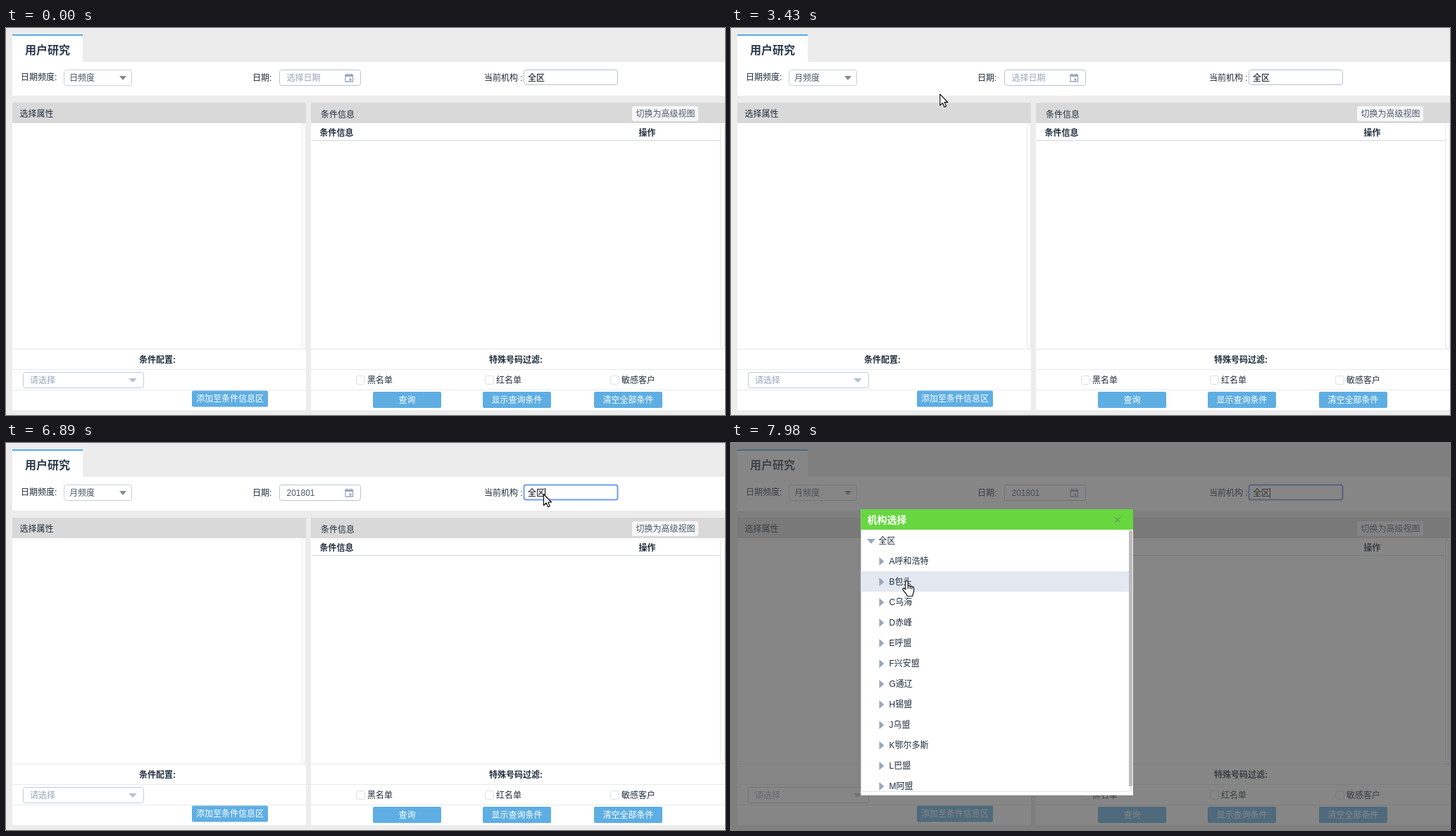
Animation, 1021 px wide and 549 px high, one loop 8 s. Source, as an HTML page:

```html
<!DOCTYPE html>
<html lang="zh-CN">
<head>
<meta charset="utf-8">
<title>用户研究</title>
<style>
html, body { margin: 0; width: 100%; height: 100%; overflow: hidden; background: #ececec; }
svg { display: block; width: 100%; height: 100%; }
text { font-family: "Liberation Sans", "Noto Sans CJK SC", "Noto Sans CJK", sans-serif; white-space: pre; }
.float { filter: drop-shadow(0 1px 2px rgba(0,0,0,.2)); }
</style>
</head>
<body>
<svg id="stage" viewBox="0 0 1021 549" xmlns="http://www.w3.org/2000/svg"></svg>
<script>
const LOOP = 8000;
const INK = '#1f2d3d', GREY = '#48576a', PALE = '#97a8be', BLUE = '#20a0ff';

// ---- markup helpers ----
const rect = (x, y, w, h, fill, more = '') =>
  `<rect x="${x}" y="${y}" width="${w}" height="${h}" fill="${fill}" ${more}/>`;
const box = (x, y, w, h, stroke, more = '') =>
  rect(x + .5, y + .5, w - 1, h - 1, '#fff', `stroke="${stroke}" rx="3" ${more}`);
const path = (d, fill, more = '') => `<path d="${d}" fill="${fill}" ${more}/>`;
const label = (s, x, mid, fill = INK, size = 12, more = '') =>
  `<text x="${x}" y="${mid + size * .37}" font-size="${size}" fill="${fill}" ${more}>${s}</text>`;
const bold = 'font-weight="700"', centred = 'text-anchor="middle"';
const hline = (x, y, w, c = '#e6e8ea') => rect(x, y, w, 1, c);
const group = (id, inner, more = '') => `<g id="${id}" ${more}>${inner}</g>`;
const button = (s, x, y, w) =>
  rect(x, y, w, 23, '#5eaee3', 'rx="2"') +
  label(s, x + w / 2, y + 11.5, '#fff', 12, centred + ' font-weight="500"');
const check = (s, x) => box(x, 493, 13, 13, '#d9dde3') + label(s, x + 16, 499.5);

// ---- page ----
function page() {
  const calendar =
    path('M482 66.5h10.5v9.5h-10.5z', 'none', `stroke="${PALE}" stroke-width="1.3"`) +
    rect(481.5, 66, 11.5, 3, PALE) + rect(483.5, 64.5, 1.5, 2, PALE) +
    rect(489.5, 64.5, 1.5, 2, PALE) + rect(487.5, 71.5, 3, 3, PALE);
  return rect(0, 0, 1021, 549, '#ececec') +
    rect(9, 9, 100, 40, '#fff') + rect(9, 9, 100, 2, '#58aaea') +
    label('用户研究', 27, 31, '#2b3a4d', 16, bold) +
    rect(9, 48, 1012, 48, '#fff') +
    label('日期频度:', 21, 69.5) +
    box(82, 59, 97, 23, '#c9d0da', 'id="freqBox"') +
    label('日频度', 90, 71, GREY, 12, 'id="freq"') + path('', '#84888f', 'id="freqArrow"') +
    label('日期:', 350, 71) +
    box(388, 59, 116, 23, '#b9c3d0', 'id="dateBox"') +
    label('选择日期', 398.5, 71, PALE, 12, 'id="date"') + calendar +
    rect(400, 64, 1, 14, '#111', 'id="dateCaret"') +
    label('当前机构 :', 679, 71) +
    box(735, 59, 134, 22, '#b3bfcd', 'id="orgBox"') + label('全区', 741, 71, '#000') +
    rect(765, 64, 1, 14, '#000', 'id="orgCaret"') +
    // left panel
    rect(9, 106, 417, 29, '#d9d9d9') + rect(9, 135, 417, 407, '#fff') +
    label('选择属性', 19.5, 121.5) +
    box(420, 135, 6, 320, '#e4e6e8') +
    hline(9, 455, 417) + hline(9, 484, 417) + hline(9, 513, 417) +
    label('条件配置:', 189, 470.5, INK, 12, bold) +
    box(24, 488, 172, 23, '#bfcbd9') + label('请选择', 34, 500, PALE) +
    path('M174 497h12l-6 6z', '#b4c1d2') +
    button('添加至条件信息区', 264, 514.5, 108) +
    // right panel
    rect(433, 106, 588, 29, '#d9d9d9') + rect(433, 135, 588, 407, '#fff') +
    label('条件信息', 447, 122.5) +
    rect(889, 111, 94, 21, '#f7f7f7', 'rx="3"') + label('切换为高级视图', 894.5, 121.5, GREY) +
    label('条件信息', 445.5, 148.5, INK, 12, bold) + label('操作', 898.5, 148.5, INK, 12, bold) +
    hline(434, 159, 580, '#d5d8db') + box(1014, 137, 7, 318, '#e4e6e8') +
    hline(433, 455, 588) + hline(433, 484, 588) + hline(433, 513, 588) +
    label('特殊号码过滤:', 686, 470.5, INK, 12, bold) +
    check('黑名单', 497) + check('红名单', 680) + check('敏感客户', 858) +
    button('查询', 521, 516, 97) + button('显示查询条件', 677, 516, 97) + button('清空全部条件', 835, 516, 97);
}

function menu() {
  return group('menu',
    rect(82.5, 87.5, 96, 67, '#fff', 'stroke="#dde3ea" rx="2"') +
    rect(82, 92, 97, 29, '#6cb3e6') +
    rect(82, 121, 97, 29, '#f3f3f3', 'id="menuHover"') +
    label('日频度', 98, 107, '#fff') + label('月频度', 98, 136, GREY), 'class="float"');
}

function picker() {
  const months = '一二三四五六七八九十'.split('').concat('十一', '十二');
  const cells = months.map((m, i) => {
    const x = 406 + i % 4 * 54, y = 154 + Math.floor(i / 4) * 69.5, off = i > 7;
    return rect(x, y, 46, 31, off ? '#f3f3f3' : '#fff', i ? '' : 'id="janCell"') +
      label(m + '月', x + 22.5, y + 15, off ? '#ccc' : GREY, 12, centred + (i ? '' : ' id="jan"'));
  }).join('');
  const chevrons = 'M406.5 102l-5 5.5l5 5.5M412.5 102l-5 5.5l5 5.5' +
    'M609.5 102l5 5.5l-5 5.5M615.5 102l5 5.5l-5 5.5';
  return group('picker',
    rect(388.5, 88.5, 244, 268, '#fff', 'stroke="#d1d8e0" rx="2"') +
    path(chevrons, 'none', `stroke="${PALE}" stroke-width="1.3"`) +
    label('2018 年', 511, 110, GREY, 14, centred) + cells, 'class="float"');
}

function dialog() {
  const names = ['A呼和浩特', 'B包头', 'C乌海', 'D赤峰', 'E呼盟', 'F兴安盟',
    'G通辽', 'H锡盟', 'J乌盟', 'K鄂尔多斯', 'L巴盟', 'M阿盟'];
  const rows = names.map((s, i) => {
    const y = 168 + 29 * i;
    return path(`M210.5 ${y - 6}v12l7 -6z`, PALE) + label(s, 224.5, y);
  }).join('');
  return group('dialog',
    rect(184.5, 94, 386.5, 405.5, '#fff') +
    rect(184.5, 94, 386.5, 29, '#66d73f') + label('机构选择', 193.5, 108.5, '#fff', 14, bold) +
    path('M545 105l8 8M553 105l-8 8', 'none', 'stroke="#6a9b62" stroke-width="1.2"') +
    rect(184.5, 182, 380.5, 29, '#e4e8f1', 'id="rowHover"') +
    path('M193 136h12l-6 7z', PALE) + label('全区', 209.5, 139) + rows +
    rect(184.5, 494, 386.5, 5.5, '#fff') + hline(185, 494, 380, '#dfe3ea') +
    rect(565, 123, 6, 371, '#f1f1f1') + rect(565, 124, 5, 363, '#bcbcbc', 'rx="2.5"'));
}

const outline = 'stroke="#000" stroke-width="1.1" stroke-linejoin="round"';
const cursors =
  group('arrow', path('M.5 .5V16.5L4.2 13L6.7 18.7L9.3 17.6L6.9 12H11.5Z', '#fff', outline)) +
  group('hand', path('M-1.8 2.3a1.8 1.8 0 0 1 3.6 0V8c.6-1 2.6-.8 3 .4c.8-.8 2.4-.4 2.6.8' +
    'c1-.6 2.8 0 2.8 1.6v4.4c0 2-1.6 3.4-1.8 7H.7C.2 19-3.8 16-5.3 13.2' +
    'c-1-1.8 1-3 2.2-1.8l1.3 1.4zM1.8 8v4M4.8 8.5v3.5M7.4 9.5v3', '#fff', outline)) +
  group('beam', path('M-3 -6h2l1 1l1 -1h2M0 -5v10M-3 6h2l1 -1l1 1h2', 'none', 'stroke="#000" stroke-width="1.2"'));

document.getElementById('stage').innerHTML = page() + menu() + picker() +
  rect(0, 0, 1021, 549, '#484848', 'id="shade"') + dialog() + group('cursor', cursors);

// ---- timing ----
const el = {};
document.querySelectorAll('[id]').forEach(n => el[n.id] = n);
const set = (id, name, v) => el[id].setAttribute(name, v);
const show = (id, on) => set(id, 'visibility', on ? 'visible' : 'hidden');
const clamp = v => Math.max(0, Math.min(1, v));
const easeOut = u => 1 - Math.pow(1 - clamp(u), 3);

// The screen refreshes only at these moments: [first, last, count]
const ticks = [0];
[[870, 1890, 8], [2040, 2730, 6], [2890, 3010, 2], [3160, 3580, 4], [3860, 4130, 3],
 [4280, 4440, 2], [4990, 5660, 5], [5810, 5930, 2], [6080, 6080, 1], [6350, 7010, 6],
 [7140, 7290, 2], [7440, 7980, 5]].forEach(([a, b, n]) => {
  for (let i = 0; i < n; i++) ticks.push(a + (n > 1 ? (b - a) * i / (n - 1) : 0));
});

// Pointer: time, x, y, shape
const moves = [
  [870, 18, 81, 'arrow'], [1400, 88, 75, 'hand'], [1890, 128, 74, 'hand'], [2040, 130, 75, 'hand'],
  [2600, 136, 128, 'hand'], [3010, 136, 129, 'hand'], [3160, 190, 112, 'arrow'],
  [3430, 395, 76, 'beam'], [3580, 448, 72, 'beam'], [4900, 448, 72, 'beam'],
  [4990, 446, 92, 'arrow'], [5490, 431, 156, 'hand'], [6080, 431, 156, 'arrow'],
  [6215, 431, 156, 'arrow'], [6746, 763, 72, 'arrow'], [7290, 763, 72, 'arrow'],
  [7440, 690, 90, 'arrow'], [7845, 275, 188, 'hand'], [7980, 249.5, 195, 'hand']
];

function pointer(t) {
  let i = 0;
  while (i < moves.length - 1 && moves[i + 1][0] <= t) i++;
  const a = moves[i], b = moves[i + 1] || a;
  const u = b === a ? 0 : clamp((t - a[0]) / (b[0] - a[0]));
  return { x: a[1] + (b[1] - a[1]) * u, y: a[2] + (b[2] - a[2]) * u, shape: a[3] };
}

function drop(id, top, amount) {
  show(id, amount > 0);
  set(id, 'opacity', amount);
  set(id, 'transform', `translate(0 ${top}) scale(1 ${amount}) translate(0 ${-top})`);
}

function draw(now) {
  const t = ticks.filter(v => v <= now).pop();
  const p = pointer(t);

  show('cursor', t >= 870);
  set('cursor', 'transform', `translate(${p.x} ${p.y})`);
  ['arrow', 'hand', 'beam'].forEach(s => set(s, 'display', s === p.shape ? 'inline' : 'none'));

  // frequency select
  const open = t >= 2040 && t < 3010;
  const over = t >= 1400 && t < 2040;
  set('freqBox', 'stroke', open ? '#4ba8ee' : over ? '#8391a5' : '#c9d0da');
  set('freqArrow', 'd', open ? 'M161 74h10l-5 -6z' : 'M161 68h10l-5 6z');
  el.freq.textContent = t >= 3010 ? '月频度' : '日频度';
  drop('menu', 87, t < 3000 ? easeOut((t - 1980) / 170) : 1 - easeOut((t - 2950) / 170));
  show('menuHover', open && p.y > 121);

  // date field
  const picked = t >= 5660;
  const focused = t >= 3860 && !picked;
  set('dateBox', 'stroke', focused ? '#3fa0ee' : t >= 3430 && t < 3860 ? '#8391a5' : '#b9c3d0');
  show('dateCaret', t >= 3860 && t < 4440);
  el.date.textContent = picked ? '201801' : '选择日期';
  set('date', 'fill', picked ? GREY : PALE);
  drop('picker', 88, t < 5700 ? easeOut((t - 4070) / 170) : 1 - easeOut((t - 5750) / 170));
  set('janCell', 'fill', picked ? BLUE : '#fff');
  set('jan', 'fill', picked ? '#3f95dd' : t >= 5490 ? BLUE : GREY);

  // organisation field and dialog
  const org = t >= 6870;
  set('orgBox', 'stroke', org ? '#6f9df0' : '#b3bfcd');
  set('orgBox', 'stroke-width', org ? 2 : 1);
  show('orgCaret', org && (t < 7400 || t > 7900));
  set('shade', 'opacity', Math.max(0, Math.min(.66, (t - 6902) * .0025)));
  const o = clamp((t - 6925) / 130), s = .905 + .095 * o;
  show('dialog', o > 0);
  set('dialog', 'opacity', o);
  set('dialog', 'transform', `translate(378 296.5) scale(${s}) translate(-378 -296.5)`);
  show('rowHover', t >= 7845);
}

const start = performance.now();
function loop() {
  draw((performance.now() - start) % LOOP);
  requestAnimationFrame(loop);
}
loop();
</script>
</body>
</html>
```
